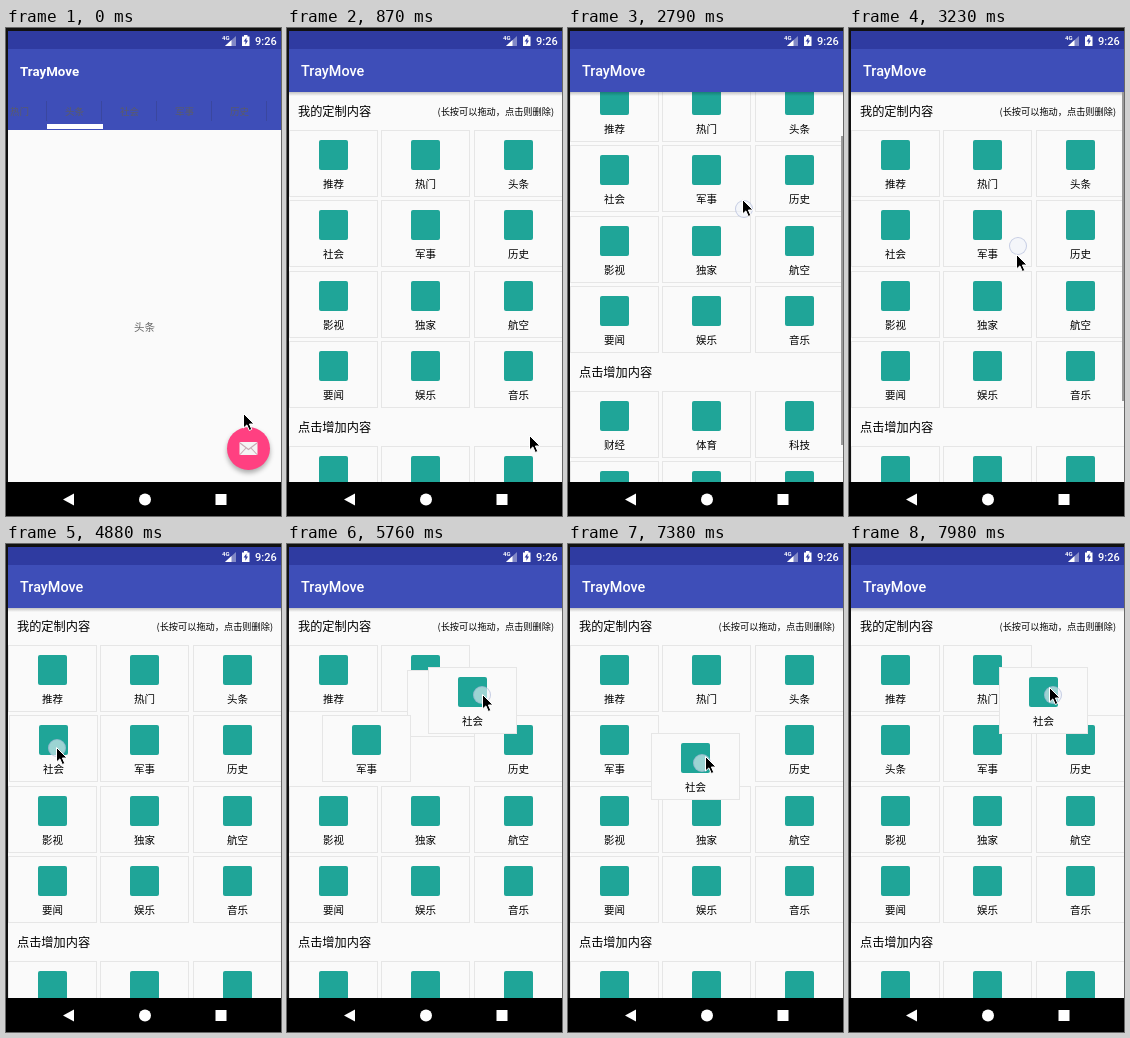
Recreate the animation shown at these times as an HTML page. Size 275 by 488 pixels, loop 8 s.

```html
<!DOCTYPE html>
<html lang="zh">
<head>
<meta charset="utf-8">
<title>TrayMove</title>
<style>
  html, body { margin: 0; width: 100%; height: 100%; overflow: hidden; background: #111; }
  #stage { position: relative; width: 275px; height: 488px; overflow: hidden; background: #111;
    font-family: "Noto Sans CJK SC", "Noto Sans CJK", "Noto Sans", sans-serif; }
  #stage div, #stage svg { position: absolute; box-sizing: border-box; }
  .screen { left: 2px; top: 3px; width: 273px; height: 451px; overflow: hidden; background: #fafafa; }
  .status { left: 0; top: 0; width: 100%; height: 18px; background: #2f3ba1; }
  .bar { left: 0; top: 18px; width: 100%; height: 43px; background: #3e4eb8; color: #fff;
    font: 500 14.4px/46px Roboto, sans-serif; padding-left: 12px; }
  #home .bar { height: 81px; font-size: 13.3px; font-weight: 700; }
  .tab { top: 61px; width: 55px; height: 38px; font-size: 9.5px; line-height: 38px; text-align: center;
    color: #5c5c68; font-weight: 500; }
  .tab::after { content: ""; position: absolute; right: 0; top: 9px; width: 1px; height: 20px; background: #3a479f; }
  .mark { left: 39px; top: 93px; width: 56px; height: 5px; background: #fff; }
  .page { left: 0; top: 286px; width: 273px; text-align: center; font-size: 10.5px; line-height: 20px; color: #666; }
  .fab { left: 219px; top: 396px; width: 43px; height: 43px; border-radius: 50%; background: #ff4081;
    box-shadow: 0 3px 5px rgba(0,0,0,.32); }
  #list { left: 0; top: 61px; width: 273px; height: 390px; overflow: hidden; }
  #content { left: 0; top: 0; width: 273px; height: 494px; color: #000; }
  .shade { left: 0; top: 0; width: 273px; height: 4px; background: linear-gradient(rgba(0,0,0,.22), transparent); }
  .head { left: 9px; font-size: 12.2px; line-height: 20px; white-space: nowrap; }
  .hint { right: 8px; top: 9px; font-size: 9.2px; line-height: 20px; white-space: nowrap; }
  .tile { left: 0; top: 0; width: 89px; height: 67px; background: #fafafa; border: 1px solid #e6e6e6;
    font-size: 10.5px; line-height: 20px; text-align: center; padding-top: 43px; }
  .tile::before { content: ""; position: absolute; left: 29px; top: 9px; width: 29px; height: 30px;
    border-radius: 2px; background: #1fa598; }
  #thumb { right: 0; top: 0; width: 2px; height: 309px; background: #999; }
  .nav { left: 0; top: 454px; width: 275px; height: 34px; background: #000; }
  #touch { left: -9px; top: -9px; width: 18px; height: 18px; border-radius: 50%;
    background: rgba(240,243,250,.6); border: 1px solid rgba(130,145,195,.4); }
  #cursor { left: -1px; top: -1px; }
</style>
</head>
<body>
<div id="stage">
  <div class="screen" id="home">
    <div class="status"></div>
    <div class="bar">TrayMove</div>
    <div class="mark"></div>
    <div class="page">头条</div>
    <div class="fab">
      <svg style="left:12px;top:14px" width="19" height="15" viewBox="0 0 19 15">
        <rect x=".5" y="1" width="18" height="13" rx="1" fill="#f4f4f4"/>
        <path d="M1 2L9.5 8.5L18 2M1 13.5L7 7M18 13.5L12 7" fill="none" stroke="#c9a9b4" stroke-width="1.1"/>
      </svg>
    </div>
  </div>
  <div class="screen" id="grid">
    <div class="status"></div>
    <div class="bar">TrayMove</div>
    <div id="list">
      <div id="content">
        <div class="head" style="top:9px">我的定制内容</div>
        <div class="hint">(长按可以拖动，点击则删除)</div>
        <div class="head" style="top:325px">点击增加内容</div>
      </div>
      <div class="shade"></div>
      <div id="thumb"></div>
    </div>
  </div>
  <svg style="left:0;top:0" width="275" height="22" fill="#fff">
    <g font-family="Roboto, sans-serif" font-weight="500">
      <text x="216" y="11.5" font-size="6" font-weight="700">4G</text>
      <text x="249" y="17" font-size="11">9:26</text>
    </g>
    <path d="M230 8V18H219Z" opacity=".4"/>
    <path d="M225.5 12V18H219Z"/>
    <path d="M236 8.5H238V7H241.5V8.5H243.5V18H236Z"/>
    <path d="M240.5 9.5L237.6 13.6H239.4V16.8L242 12.6H240.4Z" fill="#2f3ba1"/>
  </svg>
  <div class="nav">
    <svg style="left:0;top:0" width="275" height="34" fill="#fff">
      <path d="M57 17.5L68 11.5V23.5Z"/>
      <circle cx="139" cy="17.5" r="6"/>
      <rect x="209.5" y="12" width="11" height="11"/>
    </svg>
  </div>
  <div id="touch"></div>
  <svg id="cursor" width="14" height="21" viewBox="-1 -1 14 21">
    <path d="M.5 .5V15L3.9 11.9L6.3 17.5L8.8 16.4L6.4 11H11Z" fill="#000" stroke="#fff"/>
  </svg>
</div>
<script>
const LOOP = 8000, STEP = 147.9, LEAD = 24;    // the screen refreshes once per STEP
const SCROLL_FROM = 16, SCROLL_TO = 22, PRESS = 28, PICK = 33;
const TOUCH_LAG = 0.5, TILE_LAG = 0.75, SWAP_LEN = 1.7, HELD = 3;

const $ = id => document.getElementById(id);
const clamp = v => Math.min(1, Math.max(0, v));
const mix = (a, b, k) => a + (b - a) * k;
const place = (el, x, y) => { el.style.transform = `translate(${Math.round(x)}px,${Math.round(y)}px)`; };

// turning points of the pointer: step, x, y
const path = [
  [0, 237, 385], [2, 242, 407], [7, 242, 407], [12, 84, 215], [14, 219, 170],
  [SCROLL_FROM, 182, 226], [19, 174, 171], [SCROLL_TO, 167, 226],
  [27, 50, 203], [PICK, 50, 203], [36, 130, 203], [38.5, 194, 150], [43, 201, 150],
  [45, 226, 250], [47, 110, 249], [51, 146, 200], [53.5, 203, 150], [54, 200, 143]
];
// slots the held tile enters: step, slot
const visits = [[36.2, 4], [38.3, 2], [44.8, 8], [48.3, 4], [52.2, 2]];

function pointer(n) {
  const i = Math.max(1, path.findIndex(p => p[0] >= n));
  const [a, ax, ay] = path[i - 1], [b, bx, by] = path[i];
  const k = clamp((n - a) / (b - a));
  return [mix(ax, bx, k), mix(ay, by, k)];
}

function scrollAt(n) {
  if (n < SCROLL_FROM) return 0;
  return n > SCROLL_TO ? 1 : pointer(SCROLL_FROM)[1] - pointer(n)[1];
}

const slot = i => [Math.floor(92.5 * (i % 3)), Math.round(38 + 70.4 * Math.floor(i / 3))];

function add(parent, cls, text) {
  const el = document.createElement('div');
  el.className = cls;
  el.textContent = text;
  parent.appendChild(el);
  return el;
}

'热门 头条 社会 军事 历史'.split(' ').forEach((s, i) => {
  add($('home'), 'tab', s).style.left = -16 + 55 * i + 'px';
});
const tiles = '推荐 热门 头条 社会 军事 历史 影视 独家 航空 要闻 娱乐 音乐'.split(' ')
  .map(s => add($('content'), 'tile', s));
tiles[HELD].style.zIndex = 2;
'财经 体育 科技 汽车 旅游 美食'.split(' ').forEach((s, i) => {
  const [x, y] = slot(i);
  place(add($('content'), 'tile', s), x, y + 316);
});

function layTiles(n, top) {
  const order = [...tiles.keys()];
  const from = order.map(slot);
  let k = 1;
  for (const [at, to] of visits) {
    if (n < at) break;
    order.forEach((id, i) => { from[id] = slot(i); });
    order.splice(order.indexOf(HELD), 1);
    order.splice(to, 0, HELD);
    k = (1 - Math.cos(Math.PI * clamp((n - at) / SWAP_LEN))) / 2;
  }
  order.forEach((id, i) => {
    const [x, y] = slot(i), [ox, oy] = from[id];
    place(tiles[id], mix(ox, x, k), mix(oy, y, k));
  });
  if (n >= PICK) {
    const [x, y] = pointer(n - TILE_LAG);
    place(tiles[HELD], x - 49, y - 96 + top);
  }
}

function draw(ms) {
  const n = Math.floor((ms % LOOP + LEAD) / STEP);

  const open = clamp((n - 2) / 3);
  $('grid').style.opacity = Math.sqrt(open);
  place($('grid'), 0, 40 * (1 - open) ** 2);

  const top = scrollAt(n);
  place($('content'), 0, -top);
  place($('thumb'), 0, top * 309 / 389);
  $('thumb').style.opacity = clamp(n - 11) * clamp((26 - n) / 2);
  layTiles(n, top);

  const down = n >= PRESS || (n > SCROLL_FROM && n <= SCROLL_TO + 1);
  $('touch').style.visibility = down ? 'visible' : 'hidden';
  place($('touch'), ...pointer(n - TOUCH_LAG).map(v => v + 1));
  place($('cursor'), ...pointer(n));
}

const start = performance.now();
function tick() {
  draw(performance.now() - start);
  requestAnimationFrame(tick);
}
tick();
</script>
</body>
</html>
```
